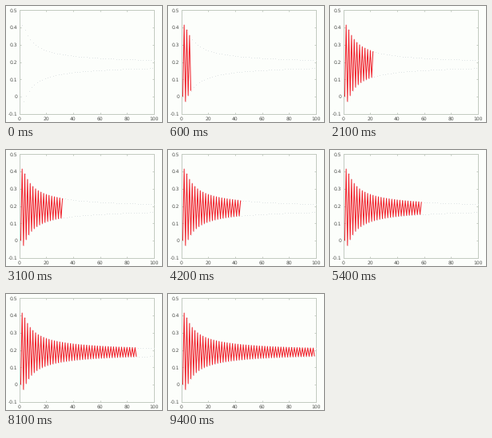
A matplotlib script for the animation above (9500 ms loop, 195x146 px).

```python
import matplotlib.pyplot as plt
import numpy as np
from matplotlib.animation import FuncAnimation

W, H, DPI = 195, 146, 100
FRAMES, INTERVAL = 95, 100
LEFT, RIGHT, TOP, BOTTOM = 16.8, 184.8, 5.3, 135.8
PAPER, INK, TEXT = "#fcfefb", "#c3cbc1", "#50524f"
RED, DOT = "#f0202a", "#dbe2e3"

plt.rcParams["font.family"] = "DejaVu Sans"
plt.rcParams["text.hinting"] = "none"
plt.rcParams["text.hinting_factor"] = 1


def px(n):
    """Pixels to points."""
    return n * 72 / DPI


def to_x(v):
    return LEFT + (RIGHT - LEFT) * v / 100


def to_y(v):
    return BOTTOM - (BOTTOM - TOP) * (v + 0.1) / 0.6


# Partial sums of (-1)^k (k^(1/k) - 1), which close in on the MRB constant
k = np.arange(1, 101)
sums = np.cumsum((-1.0) ** k * (k ** (1 / k) - 1))
xs, ys = to_x(k), to_y(sums)

fig = plt.figure(figsize=(W / DPI, H / DPI), dpi=DPI, facecolor=PAPER)
ax = fig.add_axes([0, 0, 1, 1])
ax.set_xlim(0, W)
ax.set_ylim(H, 0)
ax.axis("off")


def rule(x, y):
    ax.plot(x, y, color=INK, lw=px(1), solid_capstyle="butt", zorder=1)


def label(x, y, text, ha):
    ax.text(x, y, text, ha=ha, va="center_baseline", color=TEXT,
            fontsize=px(6.2))


rule([LEFT, RIGHT, RIGHT, LEFT, LEFT], [TOP, TOP, BOTTOM, BOTTOM, TOP])

for v in range(0, 101, 20):
    x = to_x(v)
    rule([x, x], [BOTTOM, BOTTOM - 2])
    rule([x, x], [TOP, TOP + 2])
    label(x, 142, str(v), "center")

for i in range(-1, 6):
    y = to_y(i / 10)
    rule([LEFT, LEFT + 2], [y, y])
    rule([RIGHT, RIGHT - 2], [y, y])
    label(14.4, y, f"{i / 10:g}", "right")

ax.plot(xs, ys, ls="none", marker="o", ms=px(0.9), mew=0, color=DOT, zorder=2)
trace, = ax.plot([], [], color=RED, lw=px(1), solid_joinstyle="round",
                 solid_capstyle="butt", zorder=3)

SKIPS = (32, 46, 51, 56, 61)  # steps that advance by two terms
HOLD = 91                     # step that adds no term


def terms(i):
    return i + 1 + sum(i >= s for s in SKIPS) - (i >= HOLD)


def draw(i):
    n = terms(i)
    trace.set_data(xs[:n], ys[:n])
    return trace,


anim = FuncAnimation(fig, draw, frames=FRAMES, interval=INTERVAL,
                     repeat=True, repeat_delay=0, blit=False)
plt.show()
```
